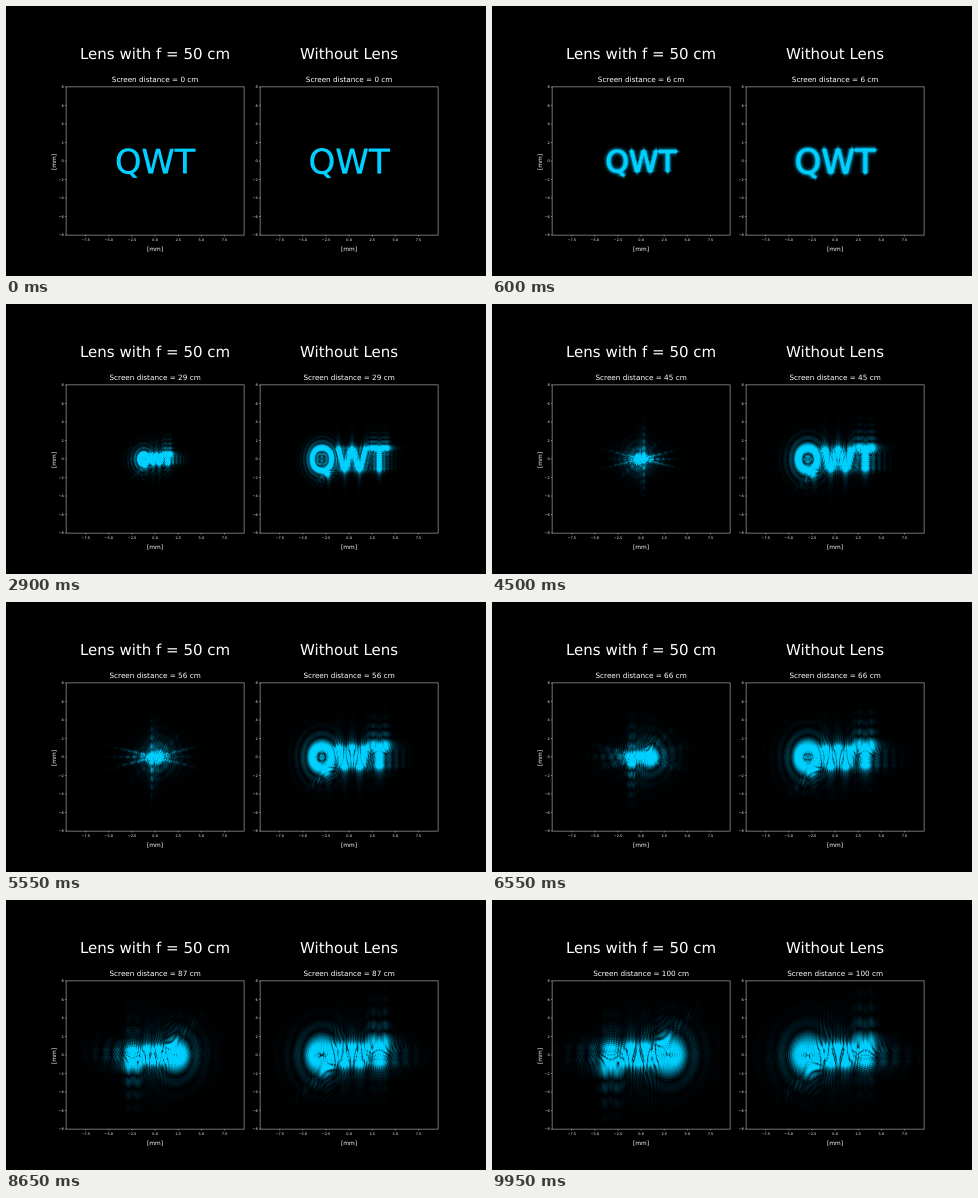
Animation of 480 by 270 pixels, one loop 10000 ms. Source, as an HTML page with a canvas:

```html
<!DOCTYPE html>
<html lang="en">
<head>
<meta charset="utf-8">
<title>Diffraction with and without a lens</title>
<style>
html, body { margin: 0; width: 100%; height: 100%; overflow: hidden; background: #000; }
canvas, svg { position: absolute; top: 0; left: 0; }
canvas { top: 81px; }
text {
  font-family: "DejaVu Sans", sans-serif;
  fill: #fff;
  text-anchor: middle;
  text-rendering: geometricPrecision;
}
</style>
</head>
<body>
<canvas id="lens" width="178" height="148" style="left:60px"></canvas>
<canvas id="free" width="178" height="148" style="left:254px"></canvas>
<svg id="plot" width="480" height="270" viewBox="0 0 480 270"></svg>
<script>
const LOOP = 10000, STEP = 50, STEPS = LOOP / STEP;
const W = 178, H = 148, CX = 89.1, CY = 74;   // panel size and optical axis, px
const PX_MM = 9.25;
const WAVE = 488e-6 * PX_MM * PX_MM;          // px² per mm of distance
const FOCAL = 500;                            // mm
const CUTOFF = 28 / PX_MM;                    // highest spatial frequency, cycles per px
const GAIN = 4;

// Labels and axes
const svg = document.getElementById('plot');
function add(tag, attrs, text) {
  const el = document.createElementNS('http://www.w3.org/2000/svg', tag);
  for (const key in attrs) el.setAttribute(key, attrs[key]);
  if (text !== undefined) el.textContent = text;
  svg.appendChild(el);
  return el;
}
const label = (text, x, y, size, style) =>
  add('text', { x, y, 'font-size': size, style: style || '' }, text);
const line = d => add('path', { d, stroke: '#fff', 'stroke-width': 0.45, fill: 'none' });
const signed = (v, digits) => (v < 0 ? '\u2212' : '') + Math.abs(v).toFixed(digits);

function drawAxes(left, title) {
  const cx = left + CX, top = 80.8, bottom = 229.2;
  label(title, cx, 52.6, 15);
  line(`M${left + 0.2} ${top}H${left + W + 0.2}V${bottom}H${left + 0.2}Z`);
  for (let v = -7.5; v <= 7.5; v += 2.5) {
    const x = cx + v * PX_MM;
    line(`M${x} ${bottom}v1.2`);
    label(signed(v, 1), x, 234.9, 3.5);
  }
  for (let v = -8; v <= 8; v += 2) {
    const y = 155 - v * PX_MM;
    line(`M${left + 0.2} ${y}h-1.2`);
    label(signed(v, 0), left - 2.3, y + 1.3, 3.5, 'text-anchor:end');
  }
  label('[mm]', cx, 244.9, 5.9);
  return label('', cx, 75.8, 7.25);
}
const captions = [drawAxes(60, 'Lens with f = 50 cm'), drawAxes(254, 'Without Lens')];
label('[mm]', 0, 0, 5.9).setAttribute('transform', 'translate(49.7 156) rotate(-90)');

// Aperture: the letters, sampled finely around the axis
const FINE = 4, MW = 86 * FINE, MH = 34 * FINE, M_LEFT = -43, M_TOP = -15;
const mask = (() => {
  const c = document.createElement('canvas');
  c.width = MW;
  c.height = MH;
  const g = c.getContext('2d');
  g.scale(FINE, FINE);
  g.font = '34px "DejaVu Sans", sans-serif';
  g.textAlign = 'center';
  g.fillText('QWT', -M_LEFT, 12.4 - M_TOP);
  const data = g.getImageData(0, 0, MW, MH).data;
  return Float32Array.from({ length: MW * MH }, (_, i) => data[i * 4 + 3] / 255);
})();

// Brightness table: linear light to display values
const gamma = v => 255 * (v <= 0.0031308 ? 12.92 * v : 1.055 * v ** (1 / 2.4) - 0.055);
const LEVELS = 8192;
const green = new Float32Array(LEVELS + 1), blue = new Float32Array(LEVELS + 1);
for (let i = 0; i <= LEVELS; i++) {
  green[i] = gamma(0.63 * i / LEVELS);
  blue[i] = gamma(i / LEVELS);
}

// Fresnel kernel along one axis, fading out towards the highest frequency
const SUB = 2, OW = W * SUB, OH = H * SUB;
function kernel(cells, start, outs, centre, z, bend) {
  const re = new Float32Array(cells * outs), im = new Float32Array(cells * outs);
  const amp = 1 / (FINE * Math.sqrt(WAVE * z));
  for (let s = 0, n = 0; s < cells; s++) {
    const p = start + (s + 0.5) / FINE;
    for (let o = 0; o < outs; o++, n++) {
      const x = (o + 0.5) / SUB - centre;
      const freq = Math.abs(bend * p - x / z) / WAVE;
      if (freq >= CUTOFF) continue;
      const phase = Math.PI / WAVE * p * (bend * p - 2 * x / z);
      const a = amp * Math.cos(Math.PI / 2 * freq / CUTOFF) ** 2;
      re[n] = a * Math.cos(phase);
      im[n] = a * Math.sin(phase);
    }
  }
  return { re, im };
}

function propagate(z, bend) {
  const kx = kernel(MW, M_LEFT, OW, CX, z, bend);
  const ky = kernel(MH, M_TOP, OH, CY, z, bend);
  const tr = new Float32Array(MH * OW), ti = new Float32Array(MH * OW);
  const filled = [];
  for (let r = 0; r < MH; r++) {
    const base = r * OW;
    let any = false;
    for (let s = 0; s < MW; s++) {
      const m = mask[r * MW + s];
      if (!m) continue;
      any = true;
      for (let o = 0, n = s * OW; o < OW; o++, n++) {
        tr[base + o] += m * kx.re[n];
        ti[base + o] += m * kx.im[n];
      }
    }
    if (any) filled.push(r);
  }
  const image = new ImageData(W, H), px = image.data;
  const ur = new Float32Array(OW), ui = new Float32Array(OW);
  const sumG = new Float32Array(W), sumB = new Float32Array(W);
  const share = 1 / (SUB * SUB);
  for (let y = 0; y < OH; y++) {
    ur.fill(0);
    ui.fill(0);
    for (const r of filled) {
      const a = ky.re[r * OH + y], b = ky.im[r * OH + y];
      if (!a && !b) continue;
      for (let o = 0, n = r * OW; o < OW; o++, n++) {
        ur[o] += a * tr[n] - b * ti[n];
        ui[o] += a * ti[n] + b * tr[n];
      }
    }
    for (let o = 0; o < OW; o++) {
      const light = Math.min(1, GAIN * (ur[o] * ur[o] + ui[o] * ui[o]));
      const level = Math.round(light * LEVELS), x = o / SUB | 0;
      sumG[x] += green[level] * share;
      sumB[x] += blue[level] * share;
    }
    if (y % SUB === SUB - 1) {
      for (let x = 0, n = (y / SUB | 0) * W * 4; x < W; x++, n += 4) {
        px[n + 1] = sumG[x];
        px[n + 2] = sumB[x];
        px[n + 3] = 255;
      }
      sumG.fill(0);
      sumB.fill(0);
    }
  }
  return image;
}

// Panels
const panels = ['lens', 'free'].map(id => document.getElementById(id).getContext('2d'));
const cache = [[], []];

function render(step) {
  const cm = step * 100 / (STEPS - 1), z = Math.max(6, cm * 10);
  panels.forEach((g, i) => {
    captions[i].textContent = `Screen distance = ${Math.round(cm)} cm`;
    const bend = 1 / z - (i === 0 ? 1 / FOCAL : 0);
    cache[i][step] = cache[i][step] || propagate(z, bend);
    g.putImageData(cache[i][step], 0, 0);
  });
}

let shown = -1;
const begin = performance.now();
function tick() {
  const t = Math.max(0, performance.now() - begin) % LOOP;
  const step = Math.floor(t / STEP);
  if (step !== shown) render(shown = step);
  requestAnimationFrame(tick);
}
tick();
</script>
</body>
</html>
```
